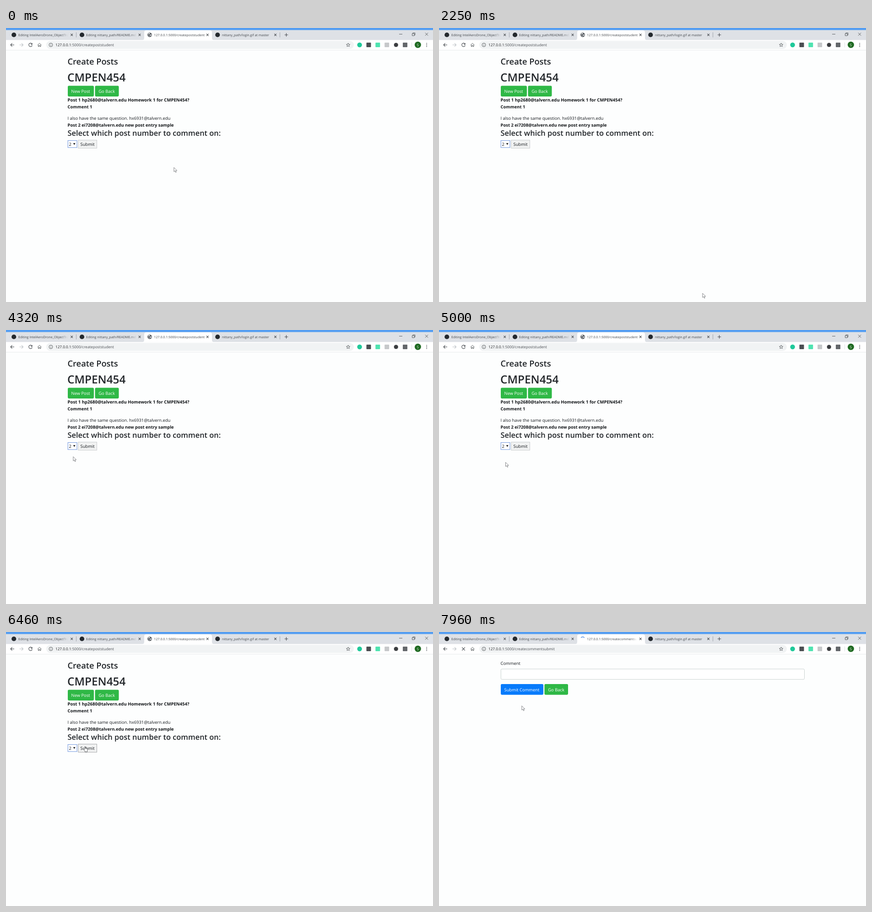
An HTML page that plays this animation: 933 by 600 pixels, repeating every 8000 ms.

```html
<!DOCTYPE html>
<html lang="en">
<head>
<meta charset="utf-8">
<title>Create Posts</title>
<style>
  html, body { margin: 0; width: 100%; height: 100%; overflow: hidden; background: #fdfefe; }
  svg { display: block; width: 933px; height: 600px; }
  text { font: 9.4px "Open Sans", "Noto Sans", sans-serif; fill: #181c20; text-rendering: geometricPrecision; white-space: pre; }
  .head { font-weight: 600; fill: #212529; }
  .bold { font-weight: 700; fill: #121518; }
  .tab { font-size: 7.05px; fill: #41454a; }
  .url { font-size: 8.16px; fill: #484c51; }
  .btn { fill: #fff; }
  .line { fill: none; stroke: #45494e; stroke-width: 1.1; }
  .thin { fill: none; stroke: #3c4043; stroke-width: .8; }
</style>
</head>
<body>
<svg viewBox="0 0 933 600">
  <defs>
    <linearGradient id="fadeGrey"><stop stop-color="#dee1e6" stop-opacity="0"/><stop offset=".85" stop-color="#dee1e6"/></linearGradient>
    <linearGradient id="fadeWhite"><stop stop-color="#fff" stop-opacity="0"/><stop offset=".85" stop-color="#fff"/></linearGradient>
    <path id="cross" class="line" d="M-2.3-2.3 2.3 2.3M2.3-2.3-2.3 2.3"/>
    <circle id="mark" r="5.1" fill="#24292e"/>
  </defs>

  <rect width="933" height="600" fill="#fdfefe"/>

  <!-- tab strip -->
  <rect width="933" height="27" fill="#dee1e6"/>
  <rect width="933" height="4.5" fill="#539df2"/>
  <path d="M297 26.5Q302 26.5 302 21.5V10Q302 5 307 5H445Q450 5 450 10V21.5Q450 26.5 455 26.5Z" fill="#fff"/>
  <path d="M153.5 9.5V20.5M598.5 9.5V20.5" stroke="#9a9fa6" stroke-width=".9"/>
  <use href="#mark" x="17.2" y="15"/>
  <use href="#mark" x="166" y="15"/>
  <use href="#mark" x="462.3" y="15"/>
  <text class="tab" x="27" y="17.5">Editing IntelAeroDrone_ObjectTra</text>
  <text class="tab" x="175" y="17.5">Editing nittany_path/README.md</text>
  <text class="tab" x="472" y="17.5">nittany_path/login.gif at master</text>
  <rect x="121" y="8" width="17" height="14" fill="url(#fadeGrey)"/>
  <rect x="271" y="8" width="17" height="14" fill="url(#fadeGrey)"/>
  <use href="#cross" x="143.7" y="15"/>
  <use href="#cross" x="292" y="15"/>
  <use href="#cross" x="440.3" y="15"/>
  <use href="#cross" x="588.6" y="15"/>
  <path class="line" d="M608.7 15H616.3M612.5 11.2V18.8"/>
  <path class="thin" d="M859 13.5H866M916 10.5 922.2 16.7M922.2 10.5 916 16.7M887.5 12.2H892.2V16.9H887.5ZM889 12V10.7H893.8V15.4H892.4"/>

  <!-- toolbar -->
  <rect y="26.3" width="933" height="22" fill="#fff"/>
  <rect y="48" width="933" height=".8" fill="#e3e5e8"/>
  <rect x="88" y="28.3" width="672" height="17.4" rx="8.7" fill="#f1f3f4"/>
  <path class="line" d="M18 37H10M13.6 33.4 10 37 13.6 40.6"/>
  <path class="line" style="stroke:#bdc1c6" d="M29.5 37H37.5M33.9 33.4 37.5 37 33.9 40.6"/>
  <path class="thin" d="M69.2 37.2 73.2 33.3 77.2 37.2M70.4 36.4V40.6H72.2V38.2H74.2V40.6H76V36.4"/>
  <circle class="thin" cx="98" cy="37" r="4"/>
  <path class="thin" d="M98 36.5V39.3M98 34.6V35.5"/>
  <path class="thin" d="M747.6 33 748.7 35.7 751.6 35.9 749.4 37.8 750.1 40.6 747.6 39.1 745.1 40.6 745.8 37.8 743.6 35.9 746.5 35.7Z"/>
  <circle cx="772.6" cy="37" r="5.2" fill="#20c99a"/>
  <rect x="787.5" y="32" width="10" height="10" rx="1" fill="#4b4e52"/>
  <rect x="807.3" y="32" width="10" height="10" rx="1" fill="#4fe3b0"/>
  <rect x="827.2" y="32" width="10" height="10" rx="1" fill="#c6c8ca"/>
  <circle cx="852.2" cy="37" r="4.6" fill="#3b3d40"/>
  <rect x="867" y="32" width="10" height="10" rx="1" fill="#64676b"/>
  <rect x="886" y="31.5" width=".8" height="11" fill="#d5d8dc"/>
  <circle cx="899.9" cy="36.8" r="7" fill="#1f6a22"/>
  <text x="899.9" y="39.6" text-anchor="middle" style="font-size:7.6px;fill:#e8f2e8">S</text>
  <g fill="#4a4e53"><circle cx="919.2" cy="33.6" r=".95"/><circle cx="919.2" cy="37" r=".95"/><circle cx="919.2" cy="40.4" r=".95"/></g>

  <g id="idle">
    <circle cx="314" cy="15" r="4.8" fill="#55595e"/>
    <path d="M311 12.2Q313 10.8 314.8 11.6L313.7 13.6 311.6 14.8ZM315.4 14.2 317.6 13.8Q318 16 316.4 17.8L314.8 16.6ZM311.2 16.2 313.4 16.6 313.8 18.6Q312 18.4 311.2 16.2Z" fill="#eceef0"/>
    <text class="tab" x="323.5" y="17.5">127.0.0.1:5000/createpoststudent</text>
    <text class="url" x="108" y="39.9"><tspan fill="#202124">127.0.0.1</tspan>:5000/createpoststudent</text>
    <path class="line" d="M56.4 34.4A3.8 3.8 0 1 0 57.2 38"/>
    <path d="M57.6 32.8V36.4H54Z" fill="#45494e"/>
  </g>
  <g id="busy">
    <text class="tab" x="323.5" y="17.5">127.0.0.1:5000/createcommentsu</text>
    <rect x="420" y="8" width="15" height="14" fill="url(#fadeWhite)"/>
    <text class="url" x="108" y="39.9"><tspan fill="#202124">127.0.0.1</tspan>:5000/createcommentsubmit</text>
    <path class="line" d="M50.2 33.7 56.8 40.3M56.8 33.7 50.2 40.3"/>
    <path id="spin" fill="none" stroke-width="1.1"/>
  </g>

  <g id="posts">
    <text class="head" x="134.5" y="80.3" style="font-size:18.3px">Create Posts</text>
    <text class="head" x="134" y="117" style="font-size:24.4px">CMPEN454</text>
    <rect x="135" y="126.5" width="57" height="23.5" rx="2.4" fill="#2fb846"/>
    <rect x="194.5" y="126.5" width="52" height="23.5" rx="2.4" fill="#2fb846"/>
    <text class="btn" x="142.6" y="142.4">New Post</text>
    <text class="btn" x="202.3" y="142.4">Go Back</text>
    <text class="bold" x="134.6" y="161.3" style="font-size:9.55px">Post 1 hp2680@talvern.edu Homework 1 for CMPEN454?</text>
    <text class="bold" x="134.6" y="176.2">Comment 1</text>
    <text x="134.4" y="201.2">I also have the same question. hx6931@talvern.edu</text>
    <text class="bold" x="134.6" y="215.9">Post 2 ei7208@talvern.edu new post entry sample</text>
    <text class="head" x="134.5" y="236.3" style="font-size:16.42px">Select which post number to comment on:</text>
    <rect id="pick" x="135.2" y="246.4" width="19.8" height="15.4" fill="#fff"/>
    <text x="137.6" y="258">2</text>
    <path d="M146.8 252H151.6L149.2 256.2Z" fill="#222"/>
    <rect id="send" x="157.8" y="245.4" width="40.6" height="17.8" fill="#f1f2f2" stroke-width=".9"/>
    <text x="162.5" y="258.2">Submit</text>
  </g>

  <g id="form">
    <text x="134.5" y="72.3">Comment</text>
    <rect x="135.3" y="81" width="663.2" height="22.8" rx="2.4" fill="#fff" stroke="#c5cdcb" stroke-width=".9"/>
    <rect x="135" y="114" width="93" height="23.5" rx="2.4" fill="#087bfb"/>
    <rect x="230.4" y="114" width="51.6" height="23.5" rx="2.4" fill="#2fb846"/>
    <text class="btn" x="142.6" y="130.1">Submit Comment</text>
    <text class="btn" x="238.3" y="130.1">Go Back</text>
  </g>

  <g id="cursor">
    <path id="arrow" d="M.4.4V9.6L2.6 7.7 4.1 11.2 5.7 10.5 4.2 7.1H7.1Z" fill="#fff" stroke="#66696d" stroke-width=".8" stroke-linejoin="round"/>
    <path id="hand" d="M-.4 1Q.5-.5 1.4 1V4.3L5 5Q6.2 5.3 6.1 6.6L5.4 10.2V12H.7V10.6L-2.4 7.2Q-2.6 5.7-1.2 6.1L-.4 6.8Z" fill="#fff" stroke="#33363a" stroke-width=".8" stroke-linejoin="round"/>
  </g>
</svg>
<script>
const LOOP = 8000, CLICK = 6950, COMMIT = 7650;
// pointer tip: time, x, y
const PATH = [
  [0, 366.5, 305], [1410, 366.5, 305], [2000, 578, 591], [2230, 575.5, 580.5],
  [2420, 575.5, 580.5], [3040, 151, 263], [3340, 148, 257], [3880, 148, 257],
  [4300, 146.5, 277], [4700, 146.5, 277], [5050, 145, 290], [5980, 145, 290],
  [6340, 172, 250.5], [7380, 172, 250.5], [7900, 180.5, 161.3], [LOOP, 180.5, 161.3]
];
const el = id => document.getElementById(id);
const show = (id, on) => { el(id).style.display = on ? "" : "none"; };
const ease = u => u * u * (3 - 2 * u);

function tip(t) {
  const i = PATH.findIndex(p => p[0] > t);
  const [t0, x0, y0] = PATH[i - 1], [t1, x1, y1] = PATH[i];
  const k = ease((t - t0) / (t1 - t0));
  return [x0 + (x1 - x0) * k, y0 + (y1 - y0) * k];
}

function arc(from, to) {
  const at = deg => {
    const a = deg * Math.PI / 180;
    return `${314 + 4.4 * Math.cos(a)} ${15 + 4.4 * Math.sin(a)}`;
  };
  return `M${at(from)}A4.4 4.4 0 0 1 ${at(to)}`;
}

function draw(t) {
  const busy = t >= CLICK, done = t >= COMMIT;
  const [x, y] = tip(t);
  const over = !done && x > 157.5 && x < 198.5 && y > 245 && y < 263.5;
  show("idle", !busy);
  show("busy", busy);
  show("posts", !done);
  show("form", done);
  show("arrow", !over);
  show("hand", over);
  el("cursor").setAttribute("transform", `translate(${x} ${y})`);
  el("pick").setAttribute("stroke", busy ? "#c4c6c8" : "#6c93dc");
  el("send").setAttribute("stroke", over ? "#9b9da0" : "#c6c8ca");
  const mid = -60 - (t - 7210) * 360 / 1320;
  const start = -150 + (t - 7960) * .1;
  el("spin").setAttribute("d", done ? arc(start, start + 20 + (t - COMMIT) * .32) : arc(mid - 35, mid + 35));
  el("spin").setAttribute("stroke", done ? "#3f7fdc" : "#85898e");
}

function tick(now) {
  draw(now % LOOP);
  requestAnimationFrame(tick);
}
draw(0);
requestAnimationFrame(tick);
</script>
</body>
</html>
```
